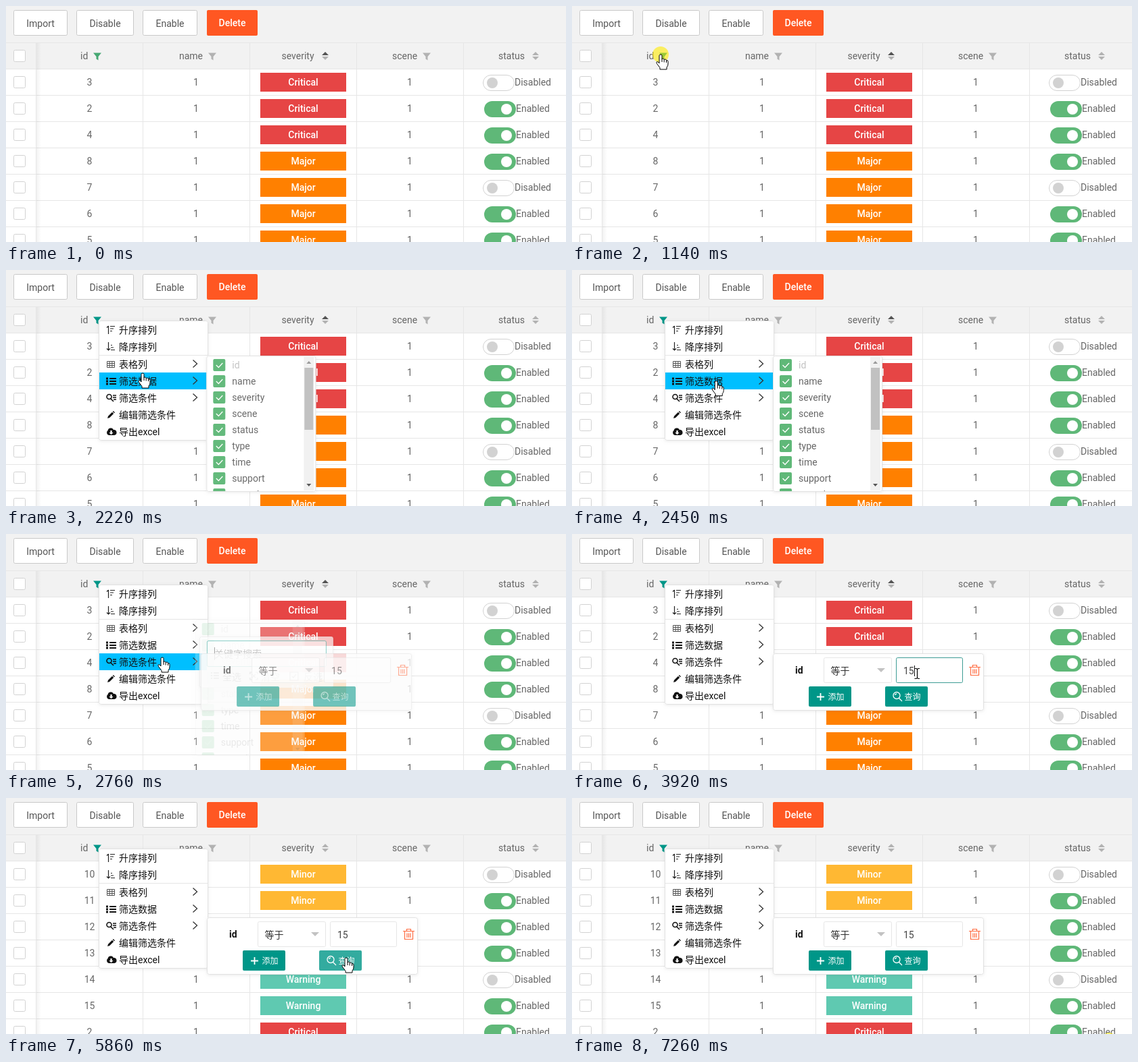
Write an HTML page with a canvas that moves like this. It is 828 px wide and 350 px high and loops after 7340 ms.

```html
<!DOCTYPE html>
<html lang="en">
<head>
<meta charset="utf-8">
<title>Table filter menu</title>
<style>
  html, body { margin: 0; height: 100%; overflow: hidden; background: #fff; }
  canvas { display: block; }
</style>
</head>
<body>
<canvas id="stage" width="828" height="350"></canvas>
<script>
const ctx = document.getElementById('stage').getContext('2d');
const LOOP = 7340;
const FONT = 'Roboto, "Noto Sans CJK SC", "Noto Sans CJK JP", sans-serif';
const GREEN = '#5FB878', TEAL = '#009688', GREY = '#b2b2b2', INK = '#666', LINE = '#e6e6e6';
const LEVEL = { Critical: '#E64545', Major: '#FF8000', Minor: '#FFB833', Warning: '#5FC9B1' };

const before = {
  ids: [3, 2, 4, 8, 7, 6, 5],
  levels: ['Critical', 'Critical', 'Critical', 'Major', 'Major', 'Major', 'Major']
};
const after = {
  ids: [10, 11, 12, 13, 14, 15, 2],
  levels: ['Minor', 'Minor', 'Minor', 'Warning', 'Warning', 'Warning', 'Critical']
};
const RELOAD = 5710;
const FOCUS = [3770, 5470];
const CLICKS = [[1140, 1370], [3770, 3920], [5310, 5470], [7260, 7340]];

// Pointer stops: time, x, y
const STOPS = [
  [210, 742, 306], [820, 131, 72], [1800, 131, 72], [2070, 196, 142], [2220, 202, 153],
  [2760, 231, 183], [2910, 240, 186], [3450, 510, 207], [4080, 510, 207], [4220, 522, 216],
  [4380, 528, 201], [4620, 528, 201], [4840, 513, 216], [5010, 513, 216], [5240, 503, 237],
  [6490, 503, 237], [6940, 794, 360], [LOOP, 794, 360]
];

const swing = p => 0.5 - Math.cos(Math.PI * Math.min(1, Math.max(0, p))) / 2;
const ramp = (t, start, length = 200) => swing((t - start) / length);
const within = (p, l, t, r, b) => p.x >= l && p.x < r && p.y >= t && p.y < b;

function pointerAt(t) {
  const i = Math.max(1, STOPS.findIndex(s => s[0] > t));
  const [t0, x0, y0] = STOPS[i - 1], [t1, x1, y1] = STOPS[i];
  const k = swing((t - t0) / (t1 - t0));
  return { x: x0 + (x1 - x0) * k, y: y0 + (y1 - y0) * k };
}

function text(s, x, y, color = INK, { size = 14, weight = 400, align = 'left' } = {}) {
  ctx.font = `${weight} ${size}px ${FONT}`;
  ctx.textAlign = align;
  ctx.fillStyle = color;
  ctx.fillText(s, x, y);
}
function rect(x, y, w, h, color) {
  ctx.fillStyle = color;
  ctx.fillRect(x, y, w, h);
}
function box(x, y, w, h, fill, border, r = 2) {
  const inset = border ? 0.5 : 0;
  ctx.beginPath();
  ctx.roundRect(x + inset, y + inset, w - 2 * inset, h - 2 * inset, r);
  ctx.fillStyle = fill;
  ctx.fill();
  if (border) {
    ctx.strokeStyle = border;
    ctx.lineWidth = 1;
    ctx.stroke();
  }
}
function disc(x, y, r, color) {
  ctx.beginPath();
  ctx.arc(x, y, r, 0, 7);
  ctx.fillStyle = color;
  ctx.fill();
}
function shape(x, y, path, { fill, stroke, width = 1 }) {
  const p = new Path2D(path);
  ctx.save();
  ctx.translate(x, y);
  if (fill) { ctx.fillStyle = fill; ctx.fill(p); }
  if (stroke) { ctx.strokeStyle = stroke; ctx.lineWidth = width; ctx.stroke(p); }
  ctx.restore();
}
function panel(x, y, w, h) {
  ctx.save();
  ctx.shadowColor = 'rgba(0,0,0,.08)';
  ctx.shadowBlur = 4;
  ctx.shadowOffsetY = 1;
  box(x, y, w, h, '#fff', null, 3);
  ctx.restore();
  box(x, y, w, h, '#fff', '#e2e2e2', 3);
}
// Panels slide in 20px from the left while they fade.
function reveal(amount, draw) {
  if (amount <= 0) return;
  ctx.save();
  ctx.globalAlpha = amount;
  ctx.translate(-20 * (1 - amount), 0);
  draw();
  ctx.restore();
}

const funnel = (x, color) => shape(x, 69, 'M0 .5H12L7.5 6V11.5L4.5 9.5V6Z', { fill: color });
function sorter(x, upColor) {
  shape(x, 68, 'M0 5L5 0L10 5Z', { fill: upColor });
  shape(x, 75, 'M0 0H10L5 5Z', { fill: GREY });
}
const checkbox = cy => box(11, cy - 9, 18, 18, '#fff', '#d2d2d2');

function toolbar() {
  rect(0, 0, 828, 54, '#f2f2f2');
  for (const [label, x, w] of [['Import', 11, 80], ['Disable', 104, 85], ['Enable', 202, 81]]) {
    box(x, 6, w, 38, '#fff', '#c9c9c9');
    text(label, x + w / 2, 31, '#555', { align: 'center' });
  }
  box(297, 6, 75, 38, '#FF5722');
  text('Delete', 334.5, 30, '#fff', { weight: 500, align: 'center' });
}

function row(i, id, level) {
  const cy = 113 + 39 * i, base = cy + 5, centered = { align: 'center' };
  checkbox(cy);
  text(id, 123.5, base, INK, centered);
  text('1', 281, base, INK, centered);
  rect(376, cy - 14, 127, 28, LEVEL[level]);
  text(level, 439.5, base, '#fff', { weight: 500, align: 'center' });
  text('1', 597, base, INK, centered);
  if (i % 4) {
    box(707, cy - 11, 47, 24, GREEN, null, 12);
    disc(740, cy + 1, 8, '#fff');
    text('Enabled', 754, base);
  } else {
    box(705, cy - 11, 47, 24, '#fff', '#d2d2d2', 12);
    disc(719, cy + 1, 8, '#d2d2d2');
    text('Disabled', 752, base);
  }
  rect(0, cy + 19, 828, 1, LINE);
}

function table(t) {
  const data = t < RELOAD ? before : after;
  rect(0, 54, 828, 296, '#fff');
  rect(0, 54, 828, 39, '#f2f2f2');
  rect(0, 54, 828, 1, LINE);
  rect(0, 93, 828, 1, LINE);
  checkbox(74);
  for (const [label, x] of [['id', 110], ['name', 256], ['severity', 407.5], ['scene', 571], ['status', 728]])
    text(label, x, 79);
  funnel(129, t < 820 ? '#46A873' : TEAL);
  funnel(299, GREY);
  funnel(616, GREY);
  sorter(467, t < RELOAD ? '#555' : GREY);
  sorter(778, GREY);
  data.ids.forEach((id, i) => row(i, id, data.levels[i]));
  for (const x of [44, 202, 360, 518, 676]) rect(x, 55, 1, 295, LINE);
  const shade = ctx.createLinearGradient(45, 0, 52, 0);
  shade.addColorStop(0, 'rgba(0,0,0,.05)');
  shade.addColorStop(1, 'rgba(0,0,0,0)');
  rect(45, 55, 7, 295, shade);
}

const thin = { stroke: '#222', width: 1.2 }, solid = { fill: '#111' };
const MENU = [
  ['升序排列', 76, 'M3.5 13V1M1 3.5L3.5 1M6 1.5H13M6 5H11M6 8.5H9', thin],
  ['降序排列', 101, 'M3.5 0V12M1 9.5L3.5 12L6 9.5M7 4.5H9M7 8H11M7 11.5H13', thin],
  ['表格列', 127, 'M1.5 2.5H12.5V11.5H1.5ZM1.5 5.5H12.5M1.5 8.5H12.5M5.2 2.5V11.5M8.8 2.5V11.5', { stroke: '#555' }],
  ['筛选数据', 152, 'M0 1.5H3V4.5H0ZM5 2H15V4H5ZM0 5.5H3V8.5H0ZM5 6H15V8H5ZM0 9.5H3V12.5H0ZM5 10H15V12H5Z', solid],
  ['筛选条件', 177, 'M8 5A3.5 3.5 0 1 1 1 5A3.5 3.5 0 1 1 8 5M7 8L11 12M10 3H15M10 6H15M11 9H15', { stroke: '#111', width: 1.6 }],
  ['编辑筛选条件', 202, 'M2 12L3 8.8L9 2.8L11.2 5L5.2 11ZM9.7 2L10.7 1L13 3.3L12 4.3Z', solid],
  ['导出excel', 227, 'M4 12A4 4 0 0 1 2.5 5A4.5 4.5 0 0 1 11 4A4 4 0 0 1 12 12ZM6.5 5V8H4.5L7.5 11L10.5 8H8.5V5Z', { fill: '#111' }]
];
function menu(pointer, active) {
  panel(137, 75, 162, 178);
  rect(138, 126, 160, 1, LINE);
  MENU.forEach(([label, y, icon, style], i) => {
    if (active && within(pointer, 138, y, 298, y + 25)) rect(138, y, 159, 25, '#00BFFF');
    shape(148, y + 6, icon, style);
    if (i === 6) shape(148, y + 6, 'M6.7 5H8.3V8H10.3L7.5 11L4.7 8H6.7Z', { fill: '#fff' });
    text(label, 167, y + 18, '#111');
    if (i > 1 && i < 5) shape(276, y + 6, 'M.5 .5L6.5 6L.5 11.5', { stroke: '#333', width: 1.3 });
  });
}

const COLUMNS = ['id', 'name', 'severity', 'scene', 'status', 'type', 'time', 'support', 'remark'];
function columnList() {
  panel(297, 127, 162, 202);
  ctx.save();
  ctx.beginPath();
  ctx.rect(298, 128, 160, 200);
  ctx.clip();
  COLUMNS.forEach((label, i) => {
    const cy = 141 + 24 * i;
    box(307, cy - 9, 18, 18, GREEN);
    shape(311, cy - 4, 'M.5 4L4 7.5L10 1', { stroke: '#fff', width: 1.4 });
    text(label, 335, cy + 5, i ? INK : '#c2c2c2');
  });
  rect(441, 129, 15, 198, '#f1f1f1');
  rect(442, 145, 13, 92, '#c1c1c1');
  shape(445, 135, 'M0 4L3.5 0L7 4Z', { fill: '#999' });
  shape(445, 317, 'M0 0H7L3.5 4Z', { fill: '#555' });
  ctx.restore();
}

function valueSearch() {
  panel(297, 152, 198, 76);
  box(308, 158, 177, 39, '#fff', TEAL);
  text('关键字搜索', 319, 183, '#888');
  rect(319, 168, 1, 19, '#333');
  shape(314, 204, 'M0 2H2M4 2H12M0 6H2M4 6H12M0 10H2M4 10H12', thin);
  shape(371, 204, 'M1 4V1H4M9 1H12V4M12 9V12H9M4 12H1V9M4 4L9 9M9 4L4 9', thin);
  shape(430, 204, 'M1 1H13V13H1ZM4 7L6 9L10 4', thin);
  text('全选', 331, 217, '#555');
  text('清空', 388, 217, '#555');
  text('反选', 451, 217, '#555');
}

function condition(t, pointer) {
  const focused = t >= FOCUS[0] && t < FOCUS[1];
  panel(297, 177, 312, 85);
  text('id', 330, 207, '#111', { weight: 700 });
  box(372, 183, 101, 38, '#fff', LINE);
  text('等于', 382.5, 208, '#333');
  shape(451, 199, 'M0 0H12L6 6Z', { fill: '#c2c2c2' });
  box(479, 183, 99, 38, '#fff', focused ? '#3D9C94' : LINE);
  text('15', 490, 208, '#444');
  if (focused && (t - FOCUS[0]) % 1060 < 530) rect(506, 195, 1, 16, '#111');
  shape(587, 194, 'M0 3.5H17M5.5 3V.5H11.5V3M2.5 4V15.5H14.5V4M6 6.5V13M8.5 6.5V13M11 6.5V13', { stroke: '#FF6B40', width: 1.2 });

  box(350, 226, 63, 30, TEAL);
  shape(362, 236, 'M5.5 0V11M0 5.5H11', { stroke: '#fff', width: 1.8 });
  text('添加', 378.5, 245.5, '#fff', { size: 12 });
  const hovered = within(pointer, 463, 226, 526, 256);
  box(463, 226, 63, 30, hovered ? '#33AB9F' : TEAL);
  shape(474, 234, 'M11 5.5A5 5 0 1 1 1 5.5A5 5 0 1 1 11 5.5M9.5 9.5L14 14M3.5 5A2.5 2.5 0 0 1 6 3', { stroke: '#fff', width: 1.3 });
  text('查询', 491.5, 245.5, '#fff', { size: 12 });
}

const HAND = 'M-2 1.5Q-2 0 0 0Q2 0 2 1.5V7Q2 6 3.5 6Q5 6 5.2 7.8Q6 6.8 7 7Q8.3 7.2 8.5 8.7Q11 8 11 10.5V14Q11 17 9 19V22H-1V19.5L-5.5 13.5Q-7 11 -5 10.5Q-4 10.3 -2 13Z';
const ARROW = 'M0 0V16L3.7 12.5L6.3 18.4L8.6 17.4L6 11.6H11.2Z';
const IBEAM = 'M-3.5 -7.5H-1L.5 -6.5L2 -7.5H4M.5 -6.5V6.5M-3.5 7.5H-1L.5 6.5L2 7.5H4';

function pointerShape(t, p) {
  const { x, y } = p, outlined = { fill: '#fff', stroke: '#000' };
  const overMenu = t > 1600 && within(p, 138, 76, 298, 252);
  const overButton = t > 2900 && within(p, 463, 226, 526, 256);
  if (t > 2900 && within(p, 479, 183, 578, 221)) {
    shape(x, y, IBEAM, { stroke: '#000', width: 1.2 });
  } else if (overMenu || overButton || within(p, 125, 66, 143, 83)) {
    shape(x, y, HAND, outlined);
    shape(x, y, 'M2 7V11M5.2 8V11.5M8.5 9V12', { stroke: '#000' });
  } else {
    shape(x, y, ARROW, outlined);
  }
}

function draw(t) {
  const pointer = pointerAt(t);
  toolbar();
  table(t);
  reveal(ramp(t, 1562), () => menu(pointer, t > 1762));
  reveal(Math.min(ramp(t, 2045), 1 - ramp(t, 2510, 330)), columnList);
  reveal(Math.min(ramp(t, 2450), 1 - ramp(t, 2654)), valueSearch);
  reveal(ramp(t, 2654), () => condition(t, pointer));
  if (CLICKS.some(([from, to]) => t >= from && t < to))
    disc(pointer.x, pointer.y, 12, 'rgba(255,235,0,.6)');
  if (t >= 210) pointerShape(t, pointer);
}

const begin = performance.now();
function frame() {
  draw((performance.now() - begin) % LOOP);
  requestAnimationFrame(frame);
}
frame();
</script>
</body>
</html>
```
